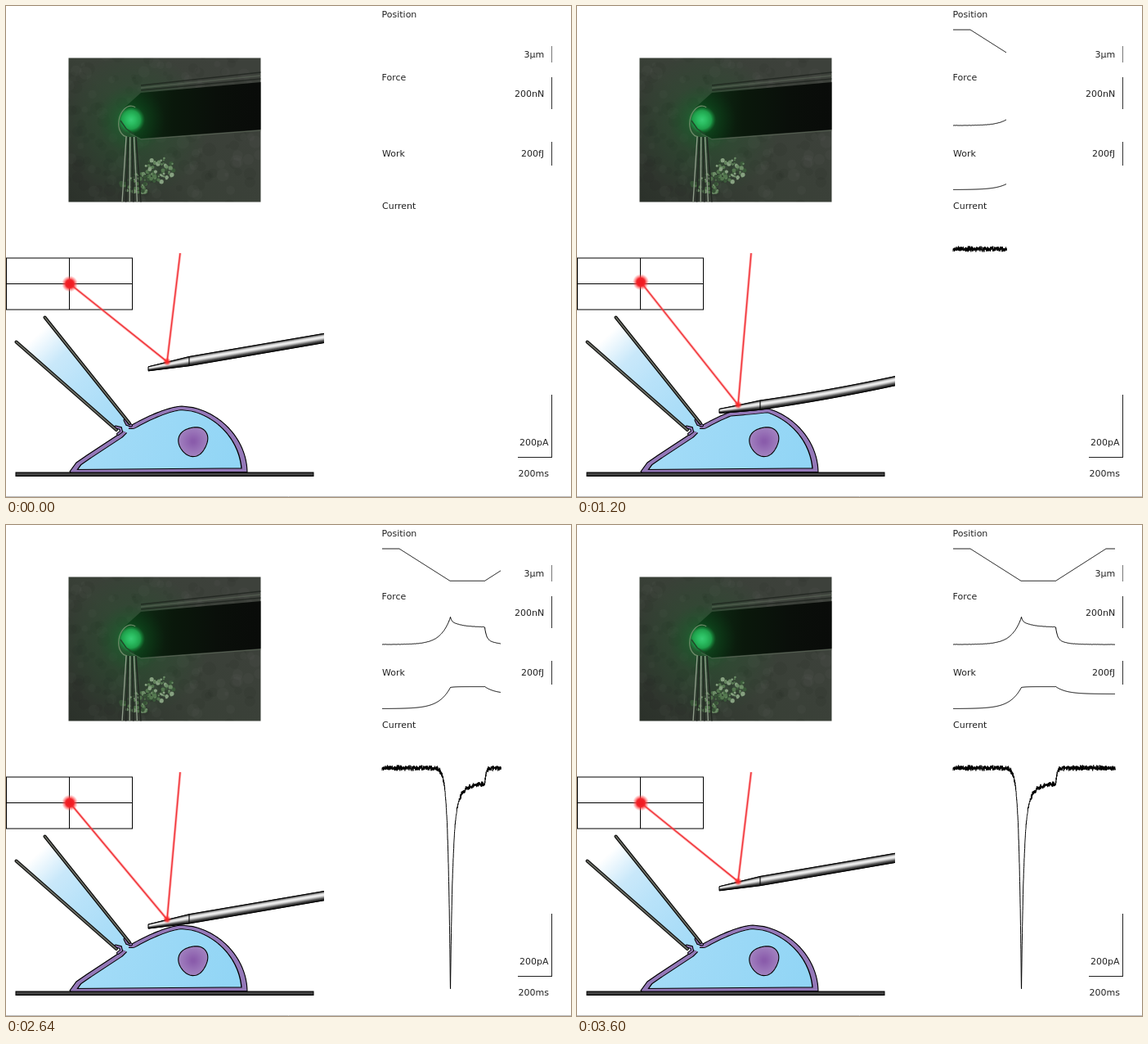
Animation of 691 by 600 pixels, one loop 3680 ms. Source, as an HTML page with a canvas:

```html
<!DOCTYPE html>
<html lang="en">
<head>
<meta charset="utf-8">
<title>Cell indentation recording</title>
<style>
  html, body { margin: 0; width: 100%; height: 100%; overflow: hidden; background: #fff; }
  canvas { display: block; }
</style>
</head>
<body>
<canvas id="stage" width="691" height="600"></canvas>
<script>
const ctx = document.getElementById('stage').getContext('2d');
const LOOP = 3680, STEP = 80;
const { exp, min, max, sin, cos, sqrt, PI } = Math;
const clamp = v => max(0, min(1, v));

let seed = 7;
const random = () => (seed = (seed * 16807) % 2147483647) / 2147483647;
const range = (from, to, step, f) => {
  const out = [];
  for (let v = from; v <= to; v += step) out.push(f(v));
  return out;
};

function trace(points) {
  ctx.beginPath();
  points.forEach(([x, y]) => ctx.lineTo(x, y));
}

function line(points, color = '#000', width = 1) {
  trace(points);
  ctx.strokeStyle = color;
  ctx.lineWidth = width;
  ctx.stroke();
}

function polygon(points, fill) {
  trace(points);
  ctx.fillStyle = fill;
  ctx.fill();
}

// Spreads the colours evenly over a gradient
function shade(gradient, ...colors) {
  colors.forEach((color, i) => gradient.addColorStop(i / (colors.length - 1), color));
  return gradient;
}

function glow(x, y, r, ...colors) {
  ctx.fillStyle = shade(ctx.createRadialGradient(x, y, 0, x, y, r), ...colors);
  ctx.fillRect(x - r, y - r, 2 * r, 2 * r);
}

// Recordings: approach ends at PEAK, retraction starts at RELEASE
const PEAK = 543.5, RELEASE = 585.5;
const phases = (rise, hold, fall) => x =>
  x < PEAK ? rise(x - PEAK) : x < RELEASE ? hold(x - PEAK) : fall(x - RELEASE);

const position = x => 29 + 39.3 * min(clamp((x - 481) / 62), clamp((647 - x) / 61.5));
const force = phases(
  u => 146 - 33 * exp(u / 12),
  u => 125 - 5 * exp(-u / 1.5) - 7.5 * exp(-u / 14),
  u => 146 - 13 * exp(-u / 2) - 8 * exp(-u / 10));
const work = phases(
  u => 224.5 - 26 * exp(u / 14),
  u => 197.6 + 0.9 * exp(-u / 5),
  u => 206.5 - 9 * exp(-u / 13));
const current = phases(
  u => 297 + 275 * exp(u / 2.9),
  u => 316 + 200 * exp(-u / 2.6) + 56 * exp(-u / 9),
  u => 297 + 19 * exp(-u / 1.5));

const record = (f, step, noise) =>
  range(460, 659, step, x => [x, f(x) + noise * (random() + random() - 1)]);
const recordings = [record(position, 0.5, 0), record(force, 0.5, 0.2), record(work, 0.5, 0), record(current, 0.14, 3.8)];

function drawChart(t) {
  const end = 459 + t * 0.0554;
  for (const points of recordings) line(points.filter(([x]) => x <= end));

  ctx.fillStyle = '#222';
  ctx.font = '11px "DejaVu Sans", sans-serif';
  const label = (text, x, y) => ctx.fillText(text, x, y);
  label('Position', 459.5, 14);
  label('Force', 459.5, 91);
  label('Work', 460, 184);
  label('Current', 460, 248);
  label('3µm', 633.5, 63);
  label('200nN', 622, 111);
  label('200fJ', 630, 184);
  label('200pA', 628, 537);
  label('200ms', 626.5, 575);

  const bar = (top, bottom, color) => line([[667.5, top], [667.5, bottom]], color);
  bar(49, 69, '#777');
  bar(87, 126, '#333');
  bar(166, 195, '#333');
  bar(475, 552, '#222');
  line([[626, 551.5], [668, 551.5]], '#222');
  line([[0, 599.5], [691, 599.5]], '#bbb');
}

// Soft random specks within an ellipse
function specks(count, x, y, rx, ry, size, colors) {
  for (let i = 0; i < count; i++) {
    const a = random() * 2 * PI, r = sqrt(random());
    ctx.fillStyle = colors[i % colors.length];
    ctx.beginPath();
    ctx.arc(x + rx * r * cos(a), y + ry * r * sin(a), size * (0.4 + random()), 0, 2 * PI);
    ctx.fill();
  }
}

function drawMicrograph() {
  seed = 11;
  ctx.save();
  ctx.beginPath();
  ctx.rect(76.5, 63.5, 235, 176);
  ctx.clip();
  ctx.fillStyle = shade(ctx.createLinearGradient(77, 239, 260, 64), '#2b312a', '#394037', '#3d413b');
  ctx.fillRect(76, 63, 236, 177);
  specks(260, 194, 152, 150, 110, 6, ['rgba(0,0,0,.05)', 'rgba(150,160,145,.04)']);
  glow(158, 145, 90, 'rgba(25,95,40,.45)', 'rgba(25,95,40,0)');
  for (let i = 1; i < 4; i++)
    line([[165, 106 - i * 3], [312, 93 - i * 4]], i % 2 ? 'rgba(20,25,20,.6)' : 'rgba(100,112,96,.5)', 1.5);

  polygon([[145, 124], [165, 106], [312, 93], [312, 151], [165, 162], [150, 154]],
    shade(ctx.createLinearGradient(150, 0, 312, 0), '#0f3016', '#0a180b', '#0a0f0a', '#090b09'));
  line([[312, 152], [165, 163], [152, 156]], '#566052');

  specks(50, 162, 216, 21, 13, 2, ['#4d6f48', '#6d8c67', '#375236']);
  specks(70, 187, 200, 19, 15, 2, ['#54774f', '#87a181', '#3b5a3a', '#6c8d66']);

  glow(153, 139, 42, 'rgba(20,150,55,.6)', 'rgba(12,110,40,.25)', 'rgba(10,90,30,0)');
  glow(153, 139, 17, '#38cd74', '#2abc60', '#1f9f4b', 'rgba(20,120,50,0)');
  ctx.beginPath();
  ctx.ellipse(151, 141, 13, 19, 0.2, 1.5, 5);
  ctx.strokeStyle = '#6f8a69';
  ctx.lineWidth = 1.2;
  ctx.stroke();
  line([[140, 140], [147, 150], [157, 157]], '#21482a', 1.5);

  for (let i = 0; i < 6; i++)
    line([[147 + i * 2.4, 160], [142 + i * 4.6, 240]], i % 2 ? '#222822' : '#8f9c8a', 1.4);
  ctx.restore();
}

function drawPipetteFluid() {
  polygon([[16, 412], [49, 384], [151, 511], [141, 521]],
    shade(ctx.createLinearGradient(38, 402, 145, 516), '#fff', '#c9e8fa', '#b8e2f9', '#addef8', '#a3dbf7'));
}

function drawPipetteWalls() {
  const tube = (points, color) => {
    line(points, '#000', 4);
    line(points, color, 2);
  };
  ctx.lineCap = 'round';
  tube([[134, 514.5], [140, 516], [141, 520], [137, 523]], '#9478b8');
  tube([[145.5, 506], [148, 511], [153, 512.5]], '#9478b8');
  tube([[12.5, 410.5], [135, 518]], '#696b62');
  tube([[47.5, 380.5], [151, 510]], '#696b62');
  ctx.lineCap = 'butt';
}

// Cantilever: a tapering tip up to JOINT, then an even stem; sag is its bend under load
const TIP = 174, JOINT = 224, BASE = 389;
const sag = u => 10.5 + 1.5 * u - 12 * u * u;
const beamTop = (x, { drop, press }) =>
  428.5 - 0.171 * (x - JOINT) + 0.076 * max(0, JOINT - x) + drop + press * sag((x - 282) / 108);
const thickness = x => 5 + 6.2 * clamp((x - TIP) / (JOINT - TIP));

function drawCantilever(pose) {
  const layers = 24;
  const at = s => x => [x, beamTop(x, pose) + s * thickness(x)];
  for (let k = 0; k <= layers; k++) {
    const s = k / layers, light = 25 + 215 * sin(PI * s ** 0.75) ** 2;
    line(range(TIP, BASE, 5, at(s)), `rgb(${light},${light},${light})`, 0.9);
  }
  for (const s of [0, 1]) line(range(TIP, BASE, 5, at(s)));
  for (const x of [TIP, JOINT]) line([at(0)(x), at(1)(x)], '#000', 1.1);
}

// Right flank is a quarter oval, left roof an eased slope. Pressing flattens the
// roof against the cantilever and bulges the flank outwards.
const APEX = { x: 215, y: 489 }, FLOOR = 571;

function cellOutline(pose) {
  const spread = clamp((pose.press - 0.25) / 0.75);
  const height = FLOOR - APEX.y;
  const flank = range(0, 1, 0.02, v =>
    [APEX.x + 80 * (1 - (1 - v) ** 2) ** 0.55, APEX.y + height * v]);
  const roof = range(0, 1, 0.05, u =>
    [154 + (APEX.x - 154) * u, 512 - 23 * (1 - (1 - u) ** 1.5)]);
  const deform = ([x, y]) => {
    const v = (y - APEX.y) / height;
    const bulge = spread * clamp((x - APEX.x) / 55) * (36 * sin(PI * v) + 25 * v * v);
    const px = x + bulge;
    return [px, max(y, beamTop(px, pose) + thickness(px))];
  };
  const left = [[142, 519], [137, 524], [99, 549], [86, 558], [78, 569], [80, FLOOR]];
  return [...left, ...flank.reverse().map(deform), ...roof.reverse().map(deform), [150, 512]];
}

function drawCell(pose) {
  const outline = cellOutline(pose);
  ctx.save();
  trace(outline);
  ctx.clip();
  ctx.fillStyle = shade(ctx.createLinearGradient(120, 510, 280, 570), '#a2dbf7', '#91d5f5');
  ctx.fill();
  // An oval pen makes the membrane wider at the sides than at the top
  const membrane = (color, width) => {
    ctx.save();
    trace(outline);
    ctx.scale(1.5, 1);
    ctx.strokeStyle = color;
    ctx.lineWidth = width;
    ctx.stroke();
    ctx.restore();
  };
  ctx.lineJoin = 'round';
  membrane('#000', 10);
  membrane('#9478b8', 8.2);
  ctx.restore();
  line(outline, '#000', 1.1);

  const shift = 9.5 * clamp((pose.press - 0.25) / 0.75);
  ctx.save();
  ctx.translate(229 + shift, 532 + shift);
  trace(range(0, 2 * PI + 0.1, 0.1, a => {
    const r = 17.8 + 0.9 * cos(3 * a + 2) - 0.6 * sin(2 * a);
    return [r * cos(a), r * sin(a)];
  }));
  ctx.fillStyle = shade(ctx.createRadialGradient(0, 0, 2, 0, 0, 19), '#8a5cab', '#a384c1');
  ctx.fill();
  ctx.lineWidth = 1.1;
  ctx.stroke();
  ctx.restore();
}

function drawDish() {
  ctx.fillStyle = '#000';
  ctx.fillRect(11.5, 569.5, 365, 5.5);
  ctx.fillStyle = '#444';
  ctx.fillRect(12.5, 570.7, 363, 3);
}

function drawLaser(pose) {
  const hit = beamTop(197, pose) - 0.5, spot = 339.5 - 10 * pose.press;
  ctx.strokeStyle = '#000';
  ctx.lineWidth = 1;
  ctx.strokeRect(0.5, 308, 154, 63);
  line([[77.5, 308], [77.5, 371]]);
  line([[0, 339.5], [155, 339.5]]);
  const beam = [[213, 302], [197, hit], [78, spot]];
  line(beam, 'rgba(255,90,90,.45)', 3.2);
  line(beam, '#f03238', 1.4);
  glow(197, hit, 5, '#f22', 'rgba(255,40,40,.7)', 'rgba(255,60,60,0)');
  glow(78, spot, 10, '#f01c22', '#f01c22', '#f3242a', 'rgba(255,70,70,.5)', 'rgba(255,90,90,0)');
}

function draw(now) {
  const t = Math.floor((now % LOOP) / STEP) * STEP;
  const drop = 66.5 * min(clamp((t - 320) / 1120), clamp((3620 - t) / 1380));
  const pose = { drop, press: clamp((drop - 48.5) / 18) };
  ctx.fillStyle = '#fff';
  ctx.fillRect(0, 0, 691, 600);
  drawMicrograph();
  drawPipetteFluid();
  drawCell(pose);
  drawPipetteWalls();
  drawDish();
  drawCantilever(pose);
  drawLaser(pose);
  drawChart(t);
  requestAnimationFrame(() => draw(performance.now() - start));
}

const start = performance.now();
draw(0);
</script>
</body>
</html>
```
